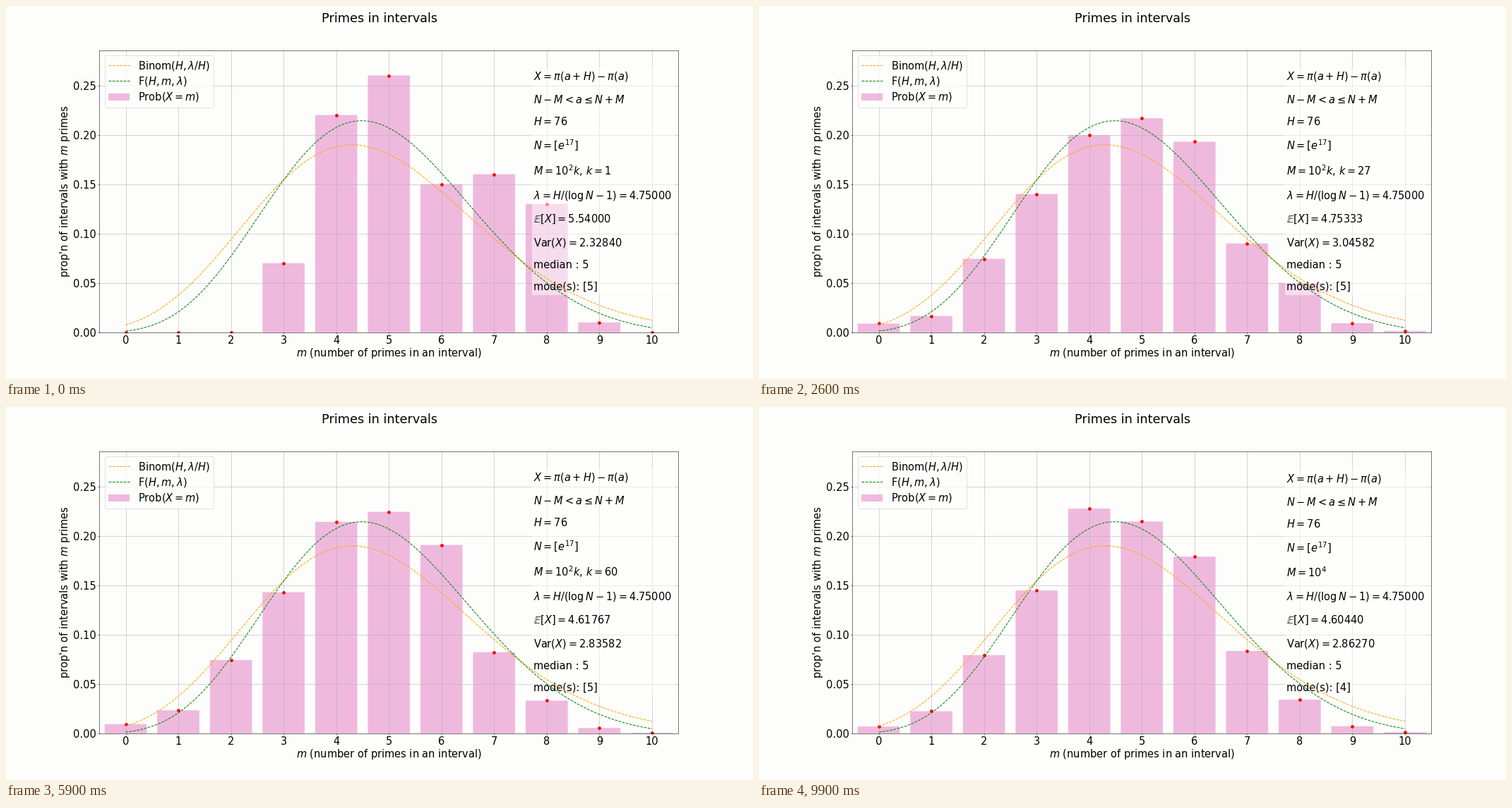
Animation of 1058 by 529 pixels, one loop 10000 ms. Source, as a matplotlib script:

```python
import math

import numpy as np
import matplotlib.pyplot as plt
from matplotlib.animation import FuncAnimation

H = 76
N = math.floor(math.exp(17))
LAM = H / (math.log(N) - 1)
STEP, FRAMES = 100, 100
PAPER = "#fdfdfc"

plt.rcParams.update({
    "font.family": "DejaVu Sans",
    "font.size": 22,
    "mathtext.fontset": "dejavusans",
    "figure.subplot.bottom": 0.125,
    "figure.facecolor": PAPER,
    "axes.facecolor": PAPER,
    "xtick.major.pad": 2.5,
})


def prime_flags(lo, hi):
    """Segmented sieve: flag i tells whether lo + i is prime."""
    flags = np.ones(hi - lo, dtype=bool)
    root = math.isqrt(hi) + 1
    small = np.ones(root + 1, dtype=bool)
    small[:2] = False
    for p in range(2, root + 1):
        if small[p]:
            small[p * p::p] = False
            flags[-lo % p::p] = False
    return flags


def interval_counts():
    """Primes in (a, a + H] for every a with N - M < a <= N + M, at the largest M."""
    reach = STEP * FRAMES
    lo = N - reach + 1
    pi = np.cumsum(prime_flags(lo, N + reach + H + 1))
    return pi[H:] - pi[:-H]


def binom(m):
    p = LAM / H
    choose = math.gamma(H + 1) / (math.gamma(m + 1) * math.gamma(H - m + 1))
    return choose * p**m * (1 - p)**(H - m)


def refined(m):
    poisson = math.exp(-LAM) * LAM**m / math.gamma(m + 1)
    shift = math.log(H) - 1 + np.euler_gamma + math.log(2 * math.pi)
    return poisson * (1 - ((m - LAM)**2 - m) * shift / (2 * H))


def caption(k, x, freq):
    size = r"$M = 10^4$" if k == FRAMES else rf"$M = 10^2k$, $k = {k}$"
    modes = [int(m) for m in np.flatnonzero(freq == freq.max())]
    return "\n\n".join([
        r"$X = \pi(a + H) - \pi(a)$",
        r"$N - M < a \leq N + M$",
        rf"$H = {H}$",
        r"$N = [e^{17}]$",
        size,
        rf"$\lambda = H/(\log N - 1) = {LAM:.5f}$",
        rf"$\mathbb{{E}}[X] = {x.mean():.5f}$",
        rf"$\mathrm{{Var}}(X) = {x.var():.5f}$",
        f"median : {np.median(x):g}",
        f"mode(s): {modes}",
    ])


counts = interval_counts()
ms = np.arange(11)

# 22 x 11 in at this dpi gives 1058 x 529 px
fig, ax = plt.subplots(figsize=(22, 11), dpi=48.091)
fig.suptitle("Primes in intervals", y=0.983)
ax.set(xlim=(-0.5, 10.5), ylim=(0, 0.285), xticks=ms)
ax.set_xlabel("$m$ (number of primes in an interval)", labelpad=1.2)
ax.set_ylabel("prop'n of intervals with $m$ primes", labelpad=2.2)
ax.grid(True)

bars = ax.bar(ms, np.zeros(11), width=0.8, color="#e377c2", alpha=0.5,
              snap=False, label="Prob$(X = m)$")
dots, = ax.plot(ms, np.zeros(11), "o", color="red", snap=False)

# The curves lie over the note's translucent panel, the dots under it
t = np.linspace(0, 10, 201)
ax.plot(t, [binom(m) for m in t], "--", color="orange", zorder=4,
        label=r"Binom$(H, \lambda/H)$")
ax.plot(t, [refined(m) for m in t], "--", color="green", zorder=4,
        label=r"F$(H, m, \lambda)$")
ax.legend(loc="upper left", bbox_to_anchor=(0, 1.003), labelspacing=0.3)
note = ax.text(0.75, 0.15, "", transform=ax.transAxes, linespacing=1.02,
               bbox=dict(facecolor="white", edgecolor="white", alpha=0.5))


def update(i):
    k = i + 1
    mid, half = STEP * FRAMES, STEP * k
    x = counts[mid - half:mid + half]
    freq = np.bincount(x, minlength=11)
    share = freq[:11] / len(x)
    for bar, h in zip(bars, share):
        bar.set_height(h)
    dots.set_ydata(share)
    note.set_text(caption(k, x, freq))
    return [*bars, dots, note]


anim = FuncAnimation(fig, update, frames=FRAMES, interval=100,
                     repeat=True, repeat_delay=0, blit=False)
plt.show()
```
